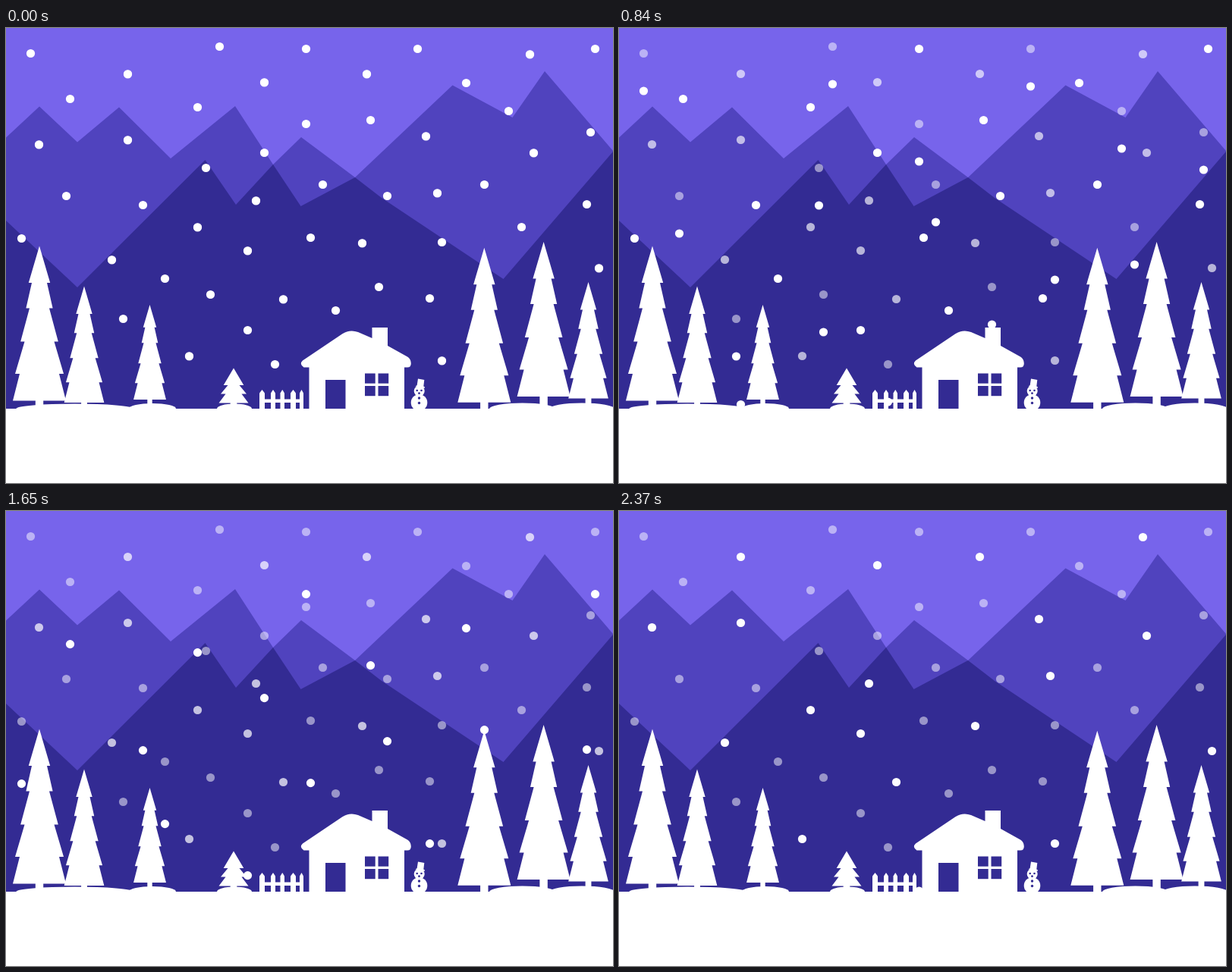
An HTML page with a canvas that plays this animation: 800x600 px, repeating every 2.4 s.

```html
<!DOCTYPE html>
<html lang="en">
<head>
<meta charset="utf-8">
<title>Snowy night</title>
<style>
html, body { margin: 0; height: 100%; overflow: hidden; }
canvas { display: block; }
</style>
</head>
<body>
<canvas id="stage" width="800" height="600"></canvas>
<script>
const ctx = document.getElementById('stage').getContext('2d');
const SKY = '#7764eb', FAR = '#5043be', NEAR = '#332b93', SNOW = '#fff';
const LOOP = 2400, GROUND = 502;

// Each group leaves faint flakes behind while bright copies fall from them.
const groups = [
  { start: 0, speed: .5185, rest: t => .65 + .35 * Math.max(0, (t - 1480) / 920), flakes: [
    [160, 60], [340, 71], [475, 60], [690, 34], [43, 153], [160, 147], [553, 142], [695, 164], [329, 227],
    [252, 262], [568, 217], [318, 293], [139, 305], [469, 283], [365, 357], [241, 432], [574, 438], [781, 316]] },
  { start: 750, speed: .5437, rest: () => .5, flakes: [
    [32, 33], [281, 24], [542, 27], [395, 126], [662, 109], [770, 137], [263, 184], [79, 221],
    [417, 206], [574, 282], [679, 262], [491, 341], [269, 351], [154, 383], [354, 443]] },
  { start: 1500, speed: .5437, rest: () => .5, flakes: [
    [395, 27], [776, 27], [84, 93], [252, 104], [606, 72], [480, 121], [340, 164], [180, 233], [630, 206],
    [502, 221], [401, 276], [20, 277], [765, 232], [209, 330], [318, 398], [434, 372], [558, 356]] }
];

function polygon(color, points) {
  ctx.fillStyle = color;
  ctx.beginPath();
  points.forEach(([x, y]) => ctx.lineTo(x, y));
  ctx.fill();
}

function rect(color, left, top, right, bottom) {
  ctx.fillStyle = color;
  ctx.fillRect(left, top, right - left, bottom - top);
}

function ellipse(color, x, y, rx, ry = rx) {
  ctx.fillStyle = color;
  ctx.beginPath();
  ctx.ellipse(x, y, rx, ry, 0, 0, 2 * Math.PI);
  ctx.fill();
}

// Tiers: [bottom, half width at the bottom, half width of the next tier's top]
const TALL = [[48.5, 14.2, 10], [82, 17.6, 13], [126, 24.8, 19.5], [168.5, 32, 26], [204, 35, 0]];
const SMALL = [[22.5, 13.3, 7.5], [34, 17, 10.5], [46, 19.5, 0]];

function tree(x, top, scale, tiers = TALL, trunk = 5.2) {
  const right = tiers.flatMap(([y, w, inset]) => [[w, y], [inset, y]]);
  const left = right.map(([w, y]) => [-w, y]).reverse();
  polygon(SNOW, [[0, 0], ...right, ...left].map(([dx, dy]) => [x + dx * scale, top + dy * scale]));
  rect(SNOW, x - trunk * scale, top + tiers.at(-1)[0] * scale - 1, x + trunk * scale, GROUND);
}

function mountains() {
  rect(SKY, 0, 0, 800, 600);
  polygon(FAR, [[0, 144.5], [44, 103.5], [94, 150.5], [149, 104.5], [217, 172], [302, 103], [352, 180],
    [389, 144], [460, 197], [588.5, 75.5], [667.5, 118], [710, 57], [800, 162], [800, 600], [0, 600]]);
  polygon(NEAR, [[0, 254], [94, 342], [262.5, 174], [303, 233], [352, 180], [388.5, 235], [460, 197],
    [495, 224], [655.5, 331], [800, 163], [800, 600], [0, 600]]);
}

function fence() {
  [[334, 341], [349, 355], [361.5, 367], [375, 382], [387, 392]].forEach(([a, b]) =>
    polygon(SNOW, [[a, GROUND], [a, 481.5], [(a + b) / 2, 477], [b, 481.5], [b, GROUND]]));
  rect(SNOW, 334, 489.5, 392, 494);
}

function house() {
  ctx.fillStyle = SNOW;
  ctx.fill(new Path2D('M392.5 447.5Q386 443 391 438.5L443 403.5Q453 397 464 401L482.5 409V395H503V419' +
    'L529 433.5Q533.5 436 533.8 442Q534 447.5 529 447.5H525V502H399.5V447.5Z'));
  rect(NEAR, 421, 464, 447.5, GROUND);
  for (const x of [473, 490.5])
    for (const y of [455.5, 472]) rect(NEAR, x, y, x + 13.7, y + 13.2);
}

function snowman() {
  ellipse(SNOW, 544.5, 494, 10.8);
  ellipse(SNOW, 544.7, 478.8, 7);
  polygon(SNOW, [[543, 462.5], [551.3, 464], [550.3, 472.5], [552, 473.5], [551.5, 475], [539.5, 472.5], [541.7, 471]]);
  for (const x of [541.7, 547.5]) ellipse(NEAR, x, 478, 1.3);
  ellipse(NEAR, 544.5, 481.7, 1.4);
  for (const y of [488, 494.5]) ellipse(NEAR, 544.5, y, 1.7);
}

function landscape() {
  mountains();
  tree(44, 287.5, 1);
  tree(103, 340.5, .752);
  tree(189.5, 365, .613);
  tree(630.3, 289.7, 1);
  tree(708.6, 282, 1);
  tree(767.5, 335, .752);
  tree(300, 448.5, 1, SMALL, 4.3);
  fence();
  house();
  snowman();
  [[90.5, 77, 6.5], [193, 31, 7], [301, 23, 6.5], [680.5, 43.5, 7.5], [759, 43, 7.5]]
    .forEach(([x, rx, ry]) => ellipse(SNOW, x, GROUND, rx, ry));
  rect(SNOW, 0, GROUND, 800, 600);
}

function snow(t) {
  for (const { start, speed, rest, flakes } of groups) {
    const fall = Math.max(0, t - start) * speed;
    ctx.globalAlpha = t < start ? 1 : rest(t);
    flakes.forEach(([x, y]) => ellipse(SNOW, x + .5, y + .5, 5.6));
    ctx.globalAlpha = 1;
    if (fall) flakes.forEach(([x, y]) => {
      if (y + fall < GROUND + 6) ellipse(SNOW, x + .5, y + fall + .5, 5.6);
    });
  }
}

function draw() {
  landscape();
  snow(performance.now() % LOOP);
  requestAnimationFrame(draw);
}
draw();
</script>
</body>
</html>
```
